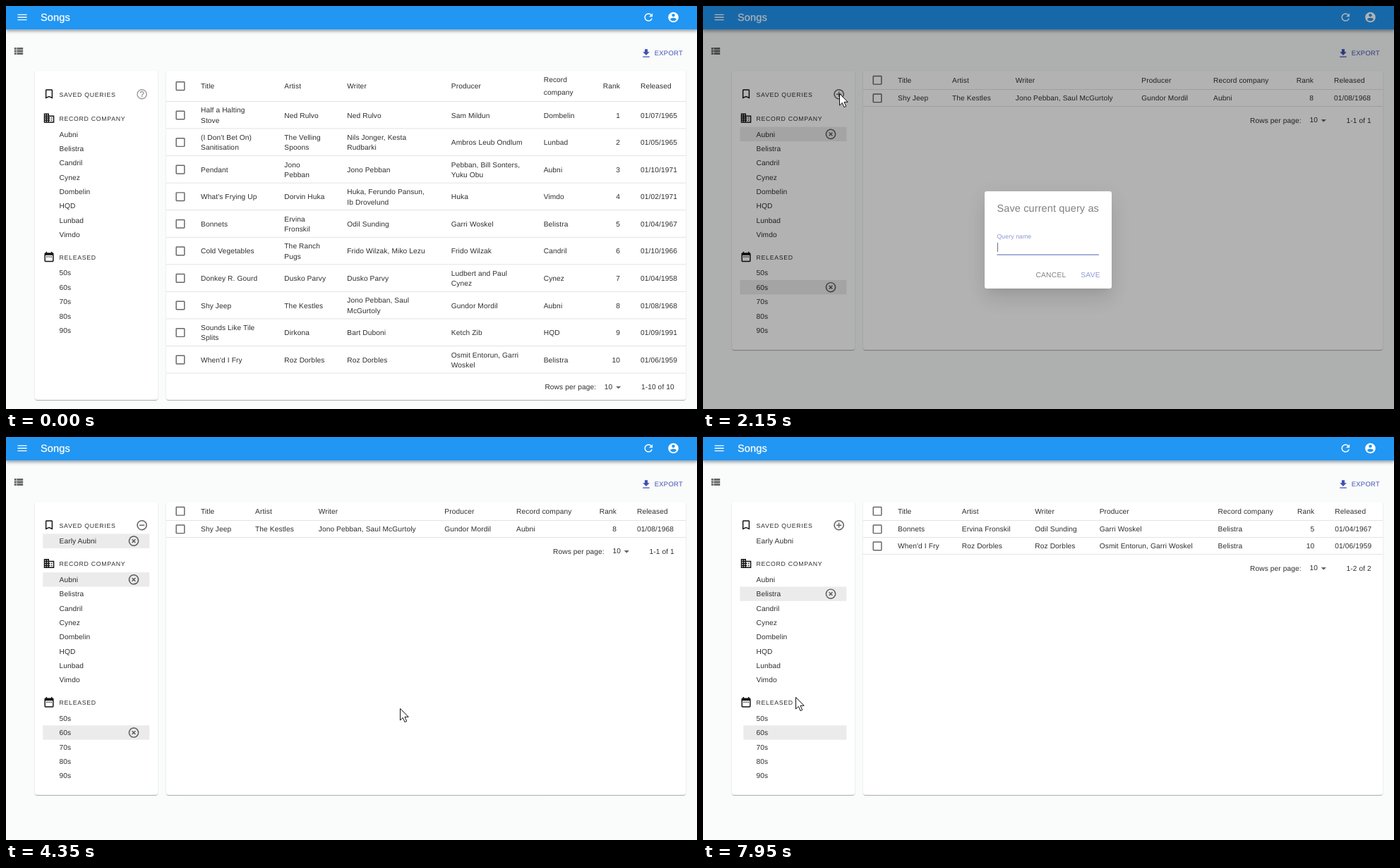
An HTML page for the animation above (8 s loop, 979 px wide and 572 px high).

```html
<!DOCTYPE html>
<html lang="en">
<head>
<meta charset="utf-8">
<title>Songs</title>
<style>
  html, body { margin: 0; width: 100%; height: 100%; overflow: hidden; background: #fafbfb; }
  body { position: relative; font-family: "Liberation Sans", Arial, sans-serif; }
  svg, .layer { position: absolute; left: 0; top: 0; width: 979px; height: 572px; overflow: hidden; }
  text { font-family: "Liberation Sans", Arial, sans-serif; text-rendering: geometricPrecision; white-space: pre; }
  .bar, .paper, .box, .field { position: absolute; }
  .bar { left: 0; top: 0; width: 979px; height: 34px;
    background: linear-gradient(#2196f3 33px, #85b4d8 33px);
    box-shadow: 0 1.5px 3px -.7px rgba(0,0,0,.2), 0 3px 3.6px rgba(0,0,0,.14), 0 .7px 7px rgba(0,0,0,.12); }
  .paper { top: 92px; background: #fff; border-radius: 3px;
    box-shadow: 0 1.5px .7px -.7px rgba(0,0,0,.2), 0 .7px .7px rgba(0,0,0,.14), 0 .7px 2.2px rgba(0,0,0,.12); }
  #side { left: 41px; width: 174px; }
  #main { left: 227px; width: 736px; }
  .shade { background: rgba(0,0,0,.5); }
  .box { left: 399px; top: 263px; width: 179.5px; height: 137.7px; background: #fff; border-radius: 3px;
    box-shadow: 0 8px 11px -5px rgba(0,0,0,.2), 0 17.5px 27.7px 2.2px rgba(0,0,0,.14), 0 6.5px 33.5px 5.8px rgba(0,0,0,.12); }
  .field { left: 416.5px; top: 335.5px; height: 13px; line-height: 13px; font-size: 11.64px;
    letter-spacing: .1px; white-space: pre; color: rgba(0,0,0,.82); text-rendering: geometricPrecision; }
  .field i { display: inline-block; width: 1px; height: 13px; background: #111; vertical-align: top; }
</style>
</head>
<body>
<div class="layer">
  <div class="bar"></div>
  <div class="paper" id="side"></div>
  <div class="paper" id="main"></div>
  <svg id="page"></svg>
</div>
<div class="layer" id="modal">
  <div class="layer shade"></div>
  <div class="box"></div>
  <svg id="form"></svg>
  <div class="field"><span id="typed"></span><i></i></div>
</div>
<svg id="pointer"></svg>

<script>
const $ = id => document.getElementById(id);
const LOOP = 8000, TICK = 50, SCALE = .7277, SIZE = 10.19;
const INK = 'rgba(0,0,0,.82)', SOFT = 'rgba(0,0,0,.6)', BLUE = '#3f51b5';

const RING = 'M12 3a9 9 0 1 0 .01 0Z';
const strokes = {
  add: RING + 'M12 7v10M7 12h10',
  remove: RING + 'M7 12h10',
  clear: RING + 'M8.7 8.7l6.6 6.6M15.3 8.7l-6.6 6.6',
  check: 'M5 4h14q1 0 1 1v14q0 1-1 1H5q-1 0-1-1V5q0-1 1-1Z'
};
const shapes = {
  menu: 'M3 18h18v-2H3zM3 13h18v-2H3zM3 6v2h18V6z',
  reload: 'M17.65 6.35C16.2 4.9 14.21 4 12 4c-4.42 0-7.99 3.58-7.99 8s3.57 8 7.99 8c3.73 0 6.84-2.55 7.73-6h-2.08c-.82 2.33-3.04 4-5.65 4-3.31 0-6-2.69-6-6s2.69-6 6-6c1.66 0 3.14.69 4.22 1.78L13 11h7V4z',
  user: 'M12 2a10 10 0 1 0 .01 0ZM12 5a3 3 0 1 1-.01 0ZM12 19.2c-2.5 0-4.71-1.28-6-3.22.03-1.99 4-3.08 6-3.08s5.97 1.09 6 3.08c-1.29 1.94-3.5 3.22-6 3.22z',
  list: 'M4 5h4v4H4zM4 10h4v4H4zM4 15h4v4H4zM9 5h12v4H9zM9 10h12v4H9zM9 15h12v4H9z',
  save: 'M19 9h-4V3H9v6H5l7 7zM5 18v2h14v-2z',
  mark: 'M17 3H7c-1.1 0-2 .9-2 2v16l7-3 7 3V5c0-1.1-.9-2-2-2zM17 18l-5-2.18L7 18V5h10z',
  house: 'M12 7V3H2v18h20V7zM6 19H4v-2h2zM6 15H4v-2h2zM6 11H4V9h2zM6 7H4V5h2zM10 19H8v-2h2zM10 15H8v-2h2zM10 11H8V9h2zM10 7H8V5h2zM20 19h-8v-2h2v-2h-2v-2h2v-2h-2V9h8zM18 11h-2v2h2zM18 15h-2v2h2z',
  date: 'M9 11H7v2h2zM13 11h-2v2h2zM17 11h-2v2h2zM19 4h-1V2h-2v2H8V2H6v2H5c-1.1 0-2 .9-2 2v14c0 1.1.9 2 2 2h14c1.1 0 2-.9 2-2V6c0-1.1-.9-2-2-2zM19 20H5V9h14z',
  help: 'M11 18h2v-2h-2zM12 2a10 10 0 1 0 .01 0ZM12 20a8 8 0 1 1 .01 0ZM12 6c-2.21 0-4 1.79-4 4h2c0-1.1.9-2 2-2s2 .9 2 2c0 2-3 1.75-3 5h2c0-2.25 3-2.5 3-5 0-2.21-1.79-4-4-4z',
  drop: 'M7 10l5 5 5-5z'
};

function el(parent, tag, attrs = {}) {
  const node = document.createElementNS('http://www.w3.org/2000/svg', tag);
  for (const k in attrs) node.setAttribute(k, attrs[k]);
  return parent.appendChild(node);
}
function icon(g, name, x, y, color = SOFT, scale = SCALE) {
  const line = strokes[name];
  return el(g, 'path', {
    d: line || shapes[name],
    transform: `translate(${x} ${y}) scale(${scale}) translate(-12 -12)`,
    fill: line ? 'none' : color, 'fill-rule': 'evenodd',
    stroke: line ? color : 'none', 'stroke-width': 2
  });
}
// y is the middle of the capitals
function label(g, x, y, str, { size = SIZE, gap = .0107, fill = INK, anchor = 'start' } = {}) {
  const node = el(g, 'text', { x, y: y + size * .358, 'font-size': size, fill,
    'letter-spacing': (gap * size).toFixed(3), 'text-anchor': anchor });
  node.textContent = str;
  return node;
}
function lines(g, x, y, str, step = 14.5) {
  const parts = str.split('|');
  parts.forEach((s, i) => label(g, x, y + (i - (parts.length - 1) / 2) * step, s));
}
const show = (node, on) => { node.style.display = on ? '' : 'none'; };

// ---- toolbar
const page = $('page');
icon(page, 'menu', 23, 16, '#fff');
const title = label(page, 49, 15.7, 'Songs', { size: 14.55, gap: .0075, fill: '#fff' });
title.setAttribute('stroke', '#fff');
title.setAttribute('stroke-width', .25);
icon(page, 'reload', 910.3, 16, '#fff');
icon(page, 'user', 945.5, 16, '#fff');
icon(page, 'list', 17.6, 64, SOFT);
icon(page, 'save', 907, 67.3, BLUE, .68);
label(page, 918.7, 67, 'EXPORT', { size: 9.46, gap: .0286, fill: BLUE });

// ---- sidebar
const ROW = 20.36, QUERY = 'Early Aubni';
const lower = el(page, 'g');
const items = [];
function heading(g, name, y, str) {
  icon(g, name, 61, y - .3, '#111');
  label(g, 75.5, y + .3, str, { size: 8.73, gap: .0833 });
}
function addItem(g, key, y) {
  const back = el(g, 'rect', { y: y - ROW / 2, height: ROW });
  label(g, 75.5, y, key);
  items.push({ g, key, y, back, clear: icon(g, 'clear', 181, y) });
}
heading(page, 'mark', 125.2, 'SAVED QUERIES');
const badges = {};
for (const name of ['help', 'add', 'remove'])
  badges[name] = icon(page, name, 192.6, 125.2, name === 'help' ? 'rgba(0,0,0,.38)' : SOFT);
const saved = el(page, 'g');
addItem(saved, QUERY, 147.6);
heading(lower, 'house', 159.4, 'RECORD COMPANY');
['Aubni', 'Belistra', 'Candril', 'Cynez', 'Dombelin', 'HQD', 'Lunbad', 'Vimdo']
  .forEach((s, i) => addItem(lower, s, 181.9 + i * ROW));
heading(lower, 'date', 356.3, 'RELEASED');
['50s', '60s', '70s', '80s', '90s'].forEach((s, i) => addItem(lower, s, 378.8 + i * ROW));

// ---- table
const songs = [
  ['Half a Halting|Stove', 'Ned Rulvo', 'Ned Rulvo', 'Sam Mildun', 'Dombelin', '07/1965'],
  ["(I Don't Bet On)|Sanitisation", 'The Velling|Spoons', 'Nils Jonger, Kesta|Rudbarki', 'Ambros Leub Ondlum', 'Lunbad', '05/1965'],
  ['Pendant', 'Jono|Pebban', 'Jono Pebban', 'Pebban, Bill Sonters,|Yuku Obu', 'Aubni', '10/1971'],
  ["What's Frying Up", 'Dorvin Huka', 'Huka, Ferundo Pansun,|Ib Drovelund', 'Huka', 'Vimdo', '02/1971'],
  ['Bonnets', 'Ervina|Fronskil', 'Odil Sunding', 'Garri Woskel', 'Belistra', '04/1967'],
  ['Cold Vegetables', 'The Ranch|Pugs', 'Frido Wilzak, Miko Lezu', 'Frido Wilzak', 'Candril', '10/1966'],
  ['Donkey R. Gourd', 'Dusko Parvy', 'Dusko Parvy', 'Ludbert and Paul|Cynez', 'Cynez', '04/1958'],
  ['Shy Jeep', 'The Kestles', 'Jono Pebban, Saul|McGurtoly', 'Gundor Mordil', 'Aubni', '08/1968'],
  ['Sounds Like Tile|Splits', 'Dirkona', 'Bart Duboni', 'Ketch Zib', 'HQD', '09/1991'],
  ["When'd I Fry", 'Roz Dorbles', 'Roz Dorbles', 'Osmit Entorun, Garri|Woskel', 'Belistra', '06/1959']
];
const heads = ['Title', 'Artist', 'Writer', 'Producer', 'Record|company'];

function table(cols, ranks, wrap) {
  const g = el(page, 'g');
  const [rankX, dateX] = cols.slice(5);
  const fit = s => wrap ? s : s.replace('|', ' ');
  const rule = y => el(g, 'rect', { x: 227, y: y - .4, width: 736, height: .8, fill: '#dcdcdc' });
  const mid = wrap ? 113.6 : 105.3, high = wrap ? 38.57 : 24.03;
  let y = wrap ? 135.4 : 118.5;
  icon(g, 'check', 247, mid);
  heads.forEach((s, i) => lines(g, cols[i], mid, fit(s), 17.5));
  label(g, rankX, mid, 'Rank', { anchor: 'end' });
  label(g, dateX, mid, 'Released');
  rule(y);
  for (const n of ranks) {
    const song = songs[n - 1], c = y + high / 2 + .3;
    icon(g, 'check', 247, c);
    for (let i = 0; i < 5; i++) lines(g, cols[i], c, fit(song[i]));
    label(g, rankX, c, n, { anchor: 'end' });
    label(g, dateX, c, '01/' + song[5]);
    rule(y += high);
  }
  const dx = ranks.length === 10 ? 0 : 11.6, n = ranks.length;
  y += 19.4;
  label(g, 763.4 + dx, y, 'Rows per page:');
  label(g, 847.8 + dx, y - .3, '10');
  icon(g, 'drop', 867.7 + dx, y + .6);
  label(g, 946.8, y, `1-${n} of ${n}`, { anchor: 'end' });
  return g;
}
const views = [
  table([276, 394.3, 483.3, 630.8, 761.7, 870, 899], [1, 2, 3, 4, 5, 6, 7, 8, 9, 10], true),
  table([276, 345, 427, 579, 735, 863, 892], [3, 8], true),
  table([276, 353, 442.7, 621.3, 723, 865, 894], [8], false),
  table([276, 356.7, 476.7, 583.5, 688.8, 854, 883], [5], false),
  table([276, 366.8, 470.3, 561.7, 729.5, 866.3, 895.3], [5, 10], false)
];

// ---- dialog
const form = $('form');
label(form, 416.4, 286.5, 'Save current query as', { size: 14.55, gap: .0075 });
label(form, 416.5, 326.6, 'Query name', { size: 8.73, gap: .0094, fill: BLUE });
el(form, 'rect', { x: 416.5, y: 352.3, width: 144.5, height: 1.5, fill: BLUE });
label(form, 471.4, 381.7, 'CANCEL', { gap: .0286 });
label(form, 535.3, 381.7, 'SAVE', { gap: .0286, fill: BLUE });

// ---- pointer
const pointer = el($('pointer'), 'g', { fill: '#fff', stroke: '#111', 'stroke-width': 1, 'stroke-linejoin': 'round' });
const arrow = el(pointer, 'path', { d: 'M.5.5V17L4.3 13.4L7 19.6L9.7 18.4L7 12.3H12.2Z' });
const hand = el(pointer, 'g');
el(hand, 'path', { d: 'M-1.7 2C-1.7-.2 1.7-.2 1.7 2V8C2.2 6.9 4.9 7 5.1 8.7C5.8 7.7 8.3 8 8.5 9.7C9.4 8.9 12 9.2 12 11.3V15C12 18.5 10.4 19 10.2 22.5H.8C.2 20-3.6 17-4.8 13.8C-5.2 11.6-2.9 11.3-1.7 14Z' });
el(hand, 'path', { d: 'M1.7 8v3.6M5.1 8.7v3.2M8.5 9.7v2.6', fill: 'none' });

// ---- timeline
const states = [
  [0, 0, []],
  [1000, 1, ['Aubni']],
  [1850, 2, ['Aubni', '60s']],
  [4300, 2, ['Aubni', '60s', QUERY]],
  [5550, 3, ['Belistra', '60s']],
  [6350, 4, ['Belistra']]
];
const fades = [[0, 0], [2150, .6], [2200, .975], [2250, .99], [2400, 1], [4300, .3], [4350, 0]];
const keys = [2600, 2700, 2850, 2950, 3100, 3150, 3300, 3350, 3450, 3550, 3600];
const path = [
  [150, 722, 535], [850, 158, 166], [950, 150, 178], [1050, 150, 178], [1800, 170, 401],
  [1850, 170, 401], [2100, 193, 124], [3750, 193, 124], [4150, 558, 385], [4350, 558, 385],
  [5100, 163, 291], [5150, 164, 292], [5250, 164, 292], [5500, 146, 221], [5600, 146, 221],
  [6100, 183, 420], [6550, 183, 420], [6900, 134, 423], [7200, 183, 421], [7750, 183, 421],
  [7950, 131, 369]
];
const last = (rows, t) => rows.filter(r => r[0] <= t).pop();

function place(t) {
  const i = path.findIndex(p => p[0] > t);
  if (i < 1) return path[i ? path.length - 1 : 0].slice(1);
  const [a, b] = [path[i - 1], path[i]];
  let k = (t - a[0]) / (b[0] - a[0]);
  k = k * k * (3 - 2 * k);
  return [a[1] + (b[1] - a[1]) * k, a[2] + (b[2] - a[2]) * k];
}

function draw(t) {
  const [, view, chosen] = last(states, t);
  const stored = t >= 4300, shift = stored ? 20.4 : 0, fade = last(fades, t)[1];
  const [x, y] = place(t);

  views.forEach((g, i) => show(g, i === view));
  $('side').style.height = $('main').style.height = (view ? 396 + shift : 467) + 'px';
  lower.setAttribute('transform', `translate(0 ${shift})`);
  show(saved, stored);
  const badge = !view ? 'help' : chosen.includes(QUERY) ? 'remove' : 'add';
  for (const name in badges) show(badges[name], name === badge);

  let over = false;
  for (const it of items) {
    const top = it.y + (it.g === lower ? shift : 0) - ROW / 2;
    const hover = t >= 150 && !fade && (it.g === lower || stored) &&
      x > 52 && x < 203 && y >= top && y < top + ROW;
    const on = chosen.includes(it.key);
    const held = it.key === '60s' && t >= 6350;
    const left = held && t >= 6400 ? 57.3 : 52.3;
    over = over || hover;
    it.back.setAttribute('x', left);
    it.back.setAttribute('width', 203.3 - left);
    it.back.setAttribute('fill', on || held ? '#ebebeb' : hover ? '#f5f5f5' : 'none');
    show(it.clear, on);
  }

  show($('modal'), fade > 0);
  $('modal').style.opacity = fade;
  $('typed').textContent = QUERY.slice(0, keys.filter(k => k <= t).length);

  show(pointer, t >= 150);
  show(arrow, !over);
  show(hand, over);
  pointer.setAttribute('transform', `translate(${Math.round(x)} ${Math.round(y)})`);
}

const start = performance.now();
function tick() {
  const t = (performance.now() - start) % LOOP;
  draw(Math.floor(t / TICK) * TICK);
  requestAnimationFrame(tick);
}
tick();
</script>
</body>
</html>
```
